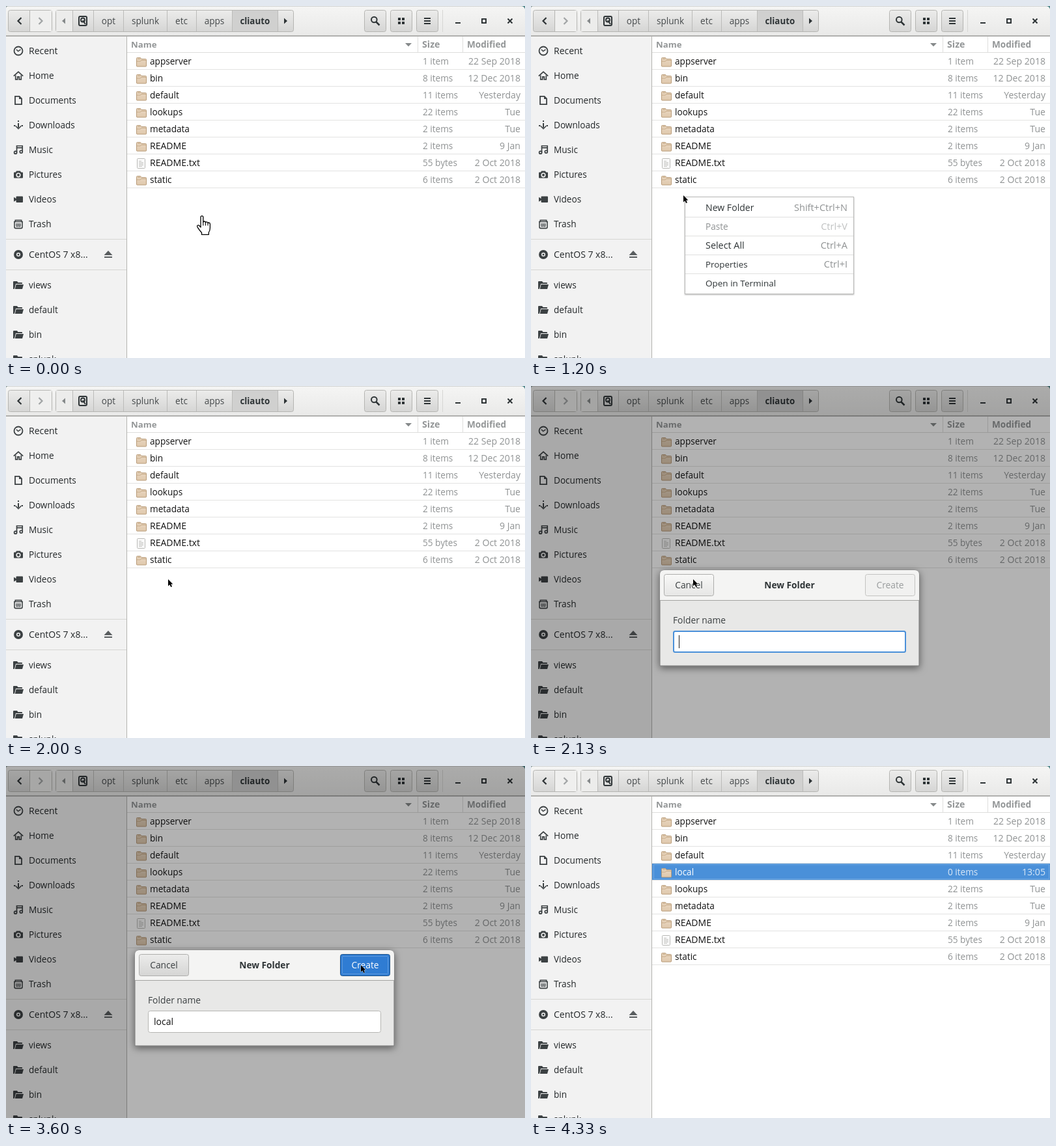
These frames come from a looping animation (797x541 px, 4.94 s). An HTML page:

```html
<!DOCTYPE html>
<html lang="en">
<head>
<meta charset="utf-8">
<title>New folder</title>
<style>
html, body { margin: 0; width: 100%; height: 100%; overflow: hidden; background: #fff; }
svg { display: block; width: 797px; height: 541px; }
text { font-family: "Open Sans", "Noto Sans", sans-serif; white-space: pre; }
</style>
</head>
<body>
<svg id="stage" viewBox="0 0 797 541" xmlns="http://www.w3.org/2000/svg"></svg>
<script>
const LOOP = 4940;
const INK = '#232729', ICON = '#3c4143', GREY = '#8f9293', BLUE = '#4a90d9', EDGE = '#b5b5b2';

const rect = (x, y, w, h, fill, more = '') =>
  `<rect x="${x}" y="${y}" width="${w}" height="${h}" fill="${fill}" ${more}/>`;
const box = (x, y, w, h, fill, stroke, r = 3, more = '') =>
  rect(x + .5, y + .5, w - 1, h - 1, fill, `stroke="${stroke}" rx="${r}" ${more}`);
const path = (d, fill = ICON, more = '') => `<path d="${d}" fill="${fill}" ${more}/>`;
const line = (d, color = ICON, w = 2) => path(d, 'none', `stroke="${color}" stroke-width="${w}"`);
const group = (id, body) => `<g id="${id}">${body}</g>`;
const at = (x, y, body) => `<g transform="translate(${x} ${y})">${body}</g>`;

function label(s, x, y, { fill = INK, size = 13.6, anchor = 'start', bold = false } = {}) {
  return `<text x="${x}" y="${y}" font-size="${size}" fill="${fill}" text-anchor="${anchor}"` +
    `${bold ? ' font-weight="700"' : ''}>${s}</text>`;
}

const gradient = (id, top, bottom) =>
  `<linearGradient id="${id}" x2="0" y2="1"><stop stop-color="${top}"/><stop offset="1" stop-color="${bottom}"/></linearGradient>`;

const defs = '<defs>' +
  gradient('bar', '#f5f5f4', '#e9e9e8') +
  gradient('button', '#ececeb', '#d5d5d4') +
  gradient('light', '#f8f8f7', '#e6e6e5') +
  gradient('blue', '#4f95dd', '#3782d3') +
  gradient('blueLight', '#62a2e4', '#4a90dc') +
  gradient('tan', '#ead8c3', '#dfc8ac') +
  '<filter id="soft" x="-20%" y="-20%" width="140%" height="150%"><feDropShadow dx="0" dy="3" stdDeviation="6" flood-opacity=".5"/></filter>' +
  '<filter id="thin"><feDropShadow dx="0" dy="1" stdDeviation="1.2" flood-opacity=".28"/></filter></defs>';

// Icons are drawn in a 16 px square.
const icons = {
  recent: line('M14.5 8a6.5 6.5 0 1 1-13 0a6.5 6.5 0 1 1 13 0', ICON, 1.8) + line('M4.8 5.8L7.6 8.6L11.5 5.8', ICON, 1.5),
  home: line('M.8 8.7L8 2.2L15.2 8.7', ICON, 1.8) + line('M3.7 7.5V13.8H6.7V9.8H9.3V13.8H12.3V7.5', ICON, 1.7),
  document: line('M3 1.9H9.5L13 5.4V14.1H3Z', ICON, 1.8) + path('M9 2V6H13Z'),
  download: line('M8 5V12', ICON, 2) + path('M3.5 8L8 12.7L12.5 8V10.3L8 14.8L3.5 10.3Z') + rect(7, 1, 2, 2, ICON) + rect(1, 8, 2, 2, ICON) + rect(13, 8, 2, 2, ICON),
  music: line('M5.5 12V2H14.2V10.5M5.5 4.8H14', ICON, 1.7) +
    '<g fill="none" stroke="#3c4143" stroke-width="1.7"><circle cx="3.6" cy="12.2" r="2"/><circle cx="12.3" cy="11" r="2"/></g>',
  camera: path('M5 2.5H11L12 4.5H14Q15 4.5 15 5.5V12.5Q15 13.5 14 13.5H2Q1 13.5 1 12.5V5.5Q1 4.5 2 4.5H4Z') +
    '<circle cx="8" cy="8.8" r="2.8" fill="#3c4143" stroke="#f2f2f2" stroke-width="1.6"/>',
  video: rect(4.5, 3.5, 10.5, 9.5, ICON, 'rx="1"') + path('M1 4.8L5 7.3V9.3L1 11.8Z'),
  trash: line('M1 4.5H15M3.3 4.5V2.2H12.7V4.5', ICON, 1.6) + line('M2 5V12.8Q2 14.6 3.8 14.6H12.2Q14 14.6 14 12.8V5', ICON, 1.6) +
    line('M5 7Q4.5 10 5.5 12.5M7 7V12.5M9 7V12.5M11 7Q11.5 10 10.5 12.5', ICON, 1.2),
  disc: '<circle cx="8" cy="8" r="7" fill="#3c4143"/><circle cx="8" cy="8" r="2.3" fill="#3c4143" stroke="#f2f2f2" stroke-width="1.5"/>',
  folder: path('M0 14V3Q0 2 1 2H6L7.5 4H13Q14 4 14 5V6H4L2 13.8Z') + path('M4.6 7H16L14 14H2.8Z')
};

const places = [
  ['Recent', 'recent', 69], ['Home', 'home', 107], ['Documents', 'document', 145], ['Downloads', 'download', 183],
  ['Music', 'music', 221], ['Pictures', 'camera', 259], ['Videos', 'video', 297], ['Trash', 'trash', 335],
  ['CentOS 7 x8...', 'disc', 382], ['views', 'folder', 429], ['default', 'folder', 467], ['bin', 'folder', 505], ['splunk', 'folder', 543]
];

const files = [
  ['appserver', '1 item', '22 Sep 2018'], ['bin', '8 items', '12 Dec 2018'], ['default', '11 items', 'Yesterday'],
  ['lookups', '22 items', 'Tue'], ['metadata', '2 items', 'Tue'], ['README', '2 items', '9 Jan'],
  ['README.txt', '55 bytes', '2 Oct 2018'], ['static', '6 items', '2 Oct 2018']
];
const filesAfter = [...files.slice(0, 3), ['local', '0 items', '13:05'], ...files.slice(3)];

const fileIcon = name => name.endsWith('.txt')
  ? box(1, 0, 13, 16, '#fafafa', '#b9b9b6', 1) + line('M4 4.5H8M4 6.5H11M4 8.5H11M4 10.5H11M4 12.5H9', '#c4c4c1', 1)
  : path('M.5 14V2.5Q.5 1.5 1.5 1.5H6.5L8 3.5H14.5Q15.5 3.5 15.5 4.5V14Q15.5 15 14.5 15H1.5Q.5 15 .5 14Z', 'url(#tan)', 'stroke="#b89b78"') +
    line('M1 7H6L8 5.5H15', '#c5a985', 1) + path('M2 2.7H6L7 4H2Z', '#c9ae8b');

function sidebar() {
  return rect(0, 47, 185, 494, '#f2f2f2') + rect(185, 47, 1, 494, '#b3b3b0') +
    rect(0, 358, 185, 1, '#d6d6d4') + rect(0, 405, 185, 1, '#d6d6d4') +
    places.map(([name, icon, y]) => at(11, y - 8, icons[icon]) +
      label(name, 35, y + 5, { size: /^(Re|Ce)/.test(name) ? 14 : 13.6 })).join('') +
    path('M150.5 383L157 376L163.5 383Z', '#5a5e60') + rect(151, 385, 12, 2, '#5a5e60');
}

function fileRow([name, size, date], i) {
  const y = 72 + 26 * i, picked = name === 'local';
  const faint = picked ? '#dbe8f6' : GREY;
  return (picked ? rect(186, y, 611, 25, BLUE) +
      rect(188.5, y + 1.5, 607, 22, 'none', 'stroke="#8ebbe8" stroke-dasharray="1 1"') : '') +
    rect(186, y + 25, 611, 1, '#e3e3e2') + at(200, y + 6, fileIcon(name)) +
    label(name, 221, y + 18, { fill: picked ? '#fff' : '#111', size: /^README/.test(name) ? 14 : 13.6 }) +
    label(size, 640, y + 18, { fill: faint }) +
    label(date, 790, y + 18, { fill: faint, size: 14.1, anchor: 'end' });
}

function listHead() {
  const style = { fill: '#939697', bold: true };
  return rect(186, 47, 611, 494, '#fff') + rect(186, 71, 611, 1, '#dededc') +
    rect(632, 47, 1, 24, '#dededc') + rect(701, 47, 1, 24, '#dededc') +
    label('Name', 192, 64, { ...style, size: 13.2 }) + label('Size', 639, 64, { ...style, size: 14.2 }) +
    label('Modified', 708, 64, style) + path('M613 57H623L618 62.3Z', '#85898a');
}

function header() {
  const cut = [76, 102, 134, 180, 247, 292, 347, 417, 442];
  const crumbs = [['opt', 157.5], ['splunk', 214], ['etc', 269.5], ['apps', 320]];
  return rect(0, 0, 797, 46, 'url(#bar)') + rect(0, 0, 797, 1, '#d2d4d4') + rect(0, 45, 797, 2, '#b0b0ae') +
    path('M792 0H797V5Q796 1 792 0Z', '#4d8588') + path('M0 0H3Q.5 .5 0 3Z', '#8a9a9b') +
    box(3, 6, 68, 34, 'url(#button)', EDGE) + rect(37, 7, 33, 32, '#efefee') + rect(36, 7, 1, 32, EDGE) +
    line('M23.5 18L18.5 23L23.5 28', '#2e3436', 2.2) + line('M50.5 18L55.5 23L50.5 28', '#a1a4a5', 2.2) +
    box(76, 6, 366, 34, 'url(#button)', EDGE) + rect(77, 7, 25, 32, '#ececeb') + rect(347, 7, 70, 32, '#d0d0cf') +
    cut.slice(1, -1).map(x => rect(x, 7, 1, 32, '#bbbbb9')).join('') +
    path('M91 18.5V27.5L86 23Z', '#85898a') + path('M427 18.5V27.5L432 23Z', '#2e3436') +
    rect(112, 16, 12, 14, 'none', 'stroke="#2e3436" stroke-width="2" rx="2"') +
    '<circle cx="118" cy="21.5" r="3" fill="none" stroke="#2e3436" stroke-width="2"/>' + line('M118 22L122 28', '#2e3436', 2) +
    crumbs.map(([s, x]) => label(s, x, 28, { fill: '#45494b', anchor: 'middle' })).join('') +
    label('cliauto', 382.3, 28, { fill: '#2e3436', anchor: 'middle', bold: true, size: 13.3 }) +
    [550, 590, 630].map(x => box(x, 6, 34, 34, 'url(#button)', EDGE)).join('') +
    '<circle cx="565.3" cy="21" r="4.3" fill="none" stroke="#2e3436" stroke-width="2"/>' + line('M568.5 24.5L573.5 29.5', '#2e3436', 2.5) +
    [[602, 18], [608, 18], [602, 24], [608, 24]].map(([x, y]) => rect(x, y, 4, 4, '#2e3436')).join('') +
    [18, 22, 26].map(y => rect(642, y, 10, 2, '#2e3436')).join('') +
    rect(670, 6, 1, 34, '#d6d6d4') + rect(690, 25, 8, 2, '#2e3436') +
    rect(731, 20, 6, 6, 'none', 'stroke="#2e3436" stroke-width="2"') +
    line('M770.5 19.5L777.5 26.5M777.5 19.5L770.5 26.5', '#2e3436', 2);
}

function menu() {
  const items = [['New Folder', 'Shift+Ctrl+N', 14.1], ['Paste', 'Ctrl+V', 13.6], ['Select All', 'Ctrl+A', 14.4],
    ['Properties', 'Ctrl+I', 13.4], ['Open in Terminal', '', 13.5]];
  const entry = ([name, keys, size], i, hot) => {
    const off = name === 'Paste', y = 315 + 29 * i;
    return label(name, 268, y, { size, fill: hot ? '#fff' : off ? '#8f9293' : '#2e3436' }) +
      label(keys, 486, y, { size: 14.5, anchor: 'end', fill: hot ? '#cfe1f4' : off ? '#bfc1c1' : GREY });
  };
  return `<g filter="url(#thin)">${box(236, 293, 260, 150, '#fff', '#b9b9b7', 0)}</g>` +
    [324, 353, 382, 411].map(y => rect(237, y, 258, 1, '#e0e0df')).join('') +
    items.map((item, i) => entry(item, i)).join('') +
    group('hot', rect(237, 294, 258, 30, BLUE) + entry(items[0], 0, true));
}

const button = (s, x, fill, edge, ink) => box(x, 289, 77, 34, fill, edge) +
  label(s, x + 38.5, 311, { fill: ink, anchor: 'middle', size: 13.8 });

function dialog() {
  const top = 'M198 330V290Q198 283 205 283H589Q596 283 596 290V330Z';
  return `<g filter="url(#soft)">${path('M198 430V290Q198 283 205 283H589Q596 283 596 290V430Z', '#e8e8e7', 'stroke="#777" stroke-width="1"')}</g>` +
    path(top, '#f4f4f3') + rect(198, 329, 398, 1, '#a3a3a1') +
    label('New Folder', 397, 311, { anchor: 'middle', bold: true, fill: '#2e3436', size: 13.7 }) +
    group('cancel', button('Cancel', 204, 'url(#button)', '#adadab', '#3a3f41')) +
    group('cancelHot', button('Cancel', 204, 'url(#light)', '#adadab', '#3a3f41')) +
    group('createOff', button('Create', 513, '#f1f1f0', '#c3c3c1', '#989b9c')) +
    group('create', button('Create', 513, 'url(#blue)', '#21609f', '#fff')) +
    group('createHot', button('Create', 513, 'url(#blueLight)', '#21609f', '#fff')) +
    group('createDown', button('Create', 513, '#2f7cd3', '#1c5187', '#fff') +
      rect(516.5, 292.5, 70, 27, 'none', 'stroke="#8cb7e6" stroke-dasharray="1 1" rx="1"')) +
    label('Folder name', 218, 365, { fill: '#3a3f41', size: 13.8 }) +
    box(218, 376, 358, 34, '#fff', '#b6b6b3') +
    group('focus', rect(219, 377, 356, 32, '#fff', `stroke="${BLUE}" stroke-width="2" rx="2.5"`)) +
    group('typed', label('local', 227, 398, { size: 14, fill: '#111' })) +
    group('caret', rect(0, 383, 1, 20, '#222'));
}

const arrow = path('M0 0V10.4L2.4 8.2L4.2 12L6 11.2L4.3 7.6H7.4Z', '#000', 'stroke="#fff" stroke-width=".8" paint-order="stroke"');
const hand = path('M6 18V2.6Q6 .7 7.9 .7Q9.8 .7 9.8 2.6V10.2Q10 9 11.6 9Q13.2 9 13.4 10.8Q13.8 9.8 15.2 9.9Q16.8 10 17 11.6Q17.4 10.9 18.6 11Q20.4 11.3 20.4 13.2V19Q20.4 23 18.3 26V29.3H7.5V26.5Q4 22.5 1 17.8Q0 15.6 1.6 15Q3 14.6 4.2 16Z',
  '#fff', 'stroke="#000" stroke-width="1.3" stroke-linejoin="round"') + line('M9.8 10V15.5M13.4 11V15.5M17 12V15.5', '#000', 1.1);

document.getElementById('stage').innerHTML = defs + listHead() +
  group('before', files.map(fileRow).join('')) + group('after', filesAfter.map(fileRow).join('')) +
  sidebar() + header() + group('menu', menu()) + group('shade', rect(0, 0, 797, 541, '#000', 'opacity=".3"')) +
  group('dialog', dialog()) + group('hand', hand) + group('arrow', arrow);

const el = {};
document.querySelectorAll('g[id]').forEach(g => { el[g.id] = g; });
const show = (id, on) => el[id].setAttribute('display', on ? 'inline' : 'none');
const move = (id, x, y) => el[id].setAttribute('transform', `translate(${x} ${y})`);

// Pointer stops: time, x, y; each holds until the next.
const handStops = [[0, 293, 322], [70, 277, 314], [130, 249, 302], [200, 230, 293]];
const arrowStops = [
  [400, 234, 291], [1470, 243, 295], [1530, 249, 297],
  [2800, 257, 306], [2870, 284, 328], [2930, 326, 344], [3000, 376, 349], [3070, 428, 345],
  [3130, 474, 336], [3200, 507, 325], [3270, 526, 316], [3330, 538, 309], [3400, 545, 306],
  [3930, 556, 309], [4000, 588, 317], [4070, 640, 329], [4130, 699, 343], [4200, 760, 357], [4270, 800, 366]
];
const stopAt = (stops, t) => stops.filter(s => s[0] <= t).pop() || stops[0];

function draw(t) {
  const within = (from, to) => t >= from && t < to;
  const [, hx, hy] = stopAt(handStops, t);
  const [, ax, ay] = stopAt(arrowStops, t);
  const enabled = t >= 2530, pressed = t >= 3600;
  const overCreate = ax >= 513 && ay < 323;
  const overCancel = ax < 281 && ay < 323;

  move('hand', hx, hy);
  move('arrow', ax, ay);
  show('hand', t < 400);
  show('arrow', t >= 400 && !within(2330, 2800) && t < 4330);

  show('before', t < 4000);
  show('after', t >= 4000);
  show('menu', within(1200, 2000));
  show('hot', within(1470, 2000));

  const open = within(2130, 3870);
  show('shade', open);
  show('dialog', open);
  show('cancel', !overCancel);
  show('cancelHot', overCancel);
  show('createOff', !enabled);
  show('create', enabled && !overCreate);
  show('createHot', enabled && overCreate && !pressed);
  show('createDown', pressed);
  show('focus', !pressed);
  show('typed', enabled);
  show('caret', !pressed);
  move('caret', enabled ? 257 : 227, 0);
}

const start = performance.now();
function tick() {
  draw((performance.now() - start) % LOOP);
  requestAnimationFrame(tick);
}
tick();
</script>
</body>
</html>
```
